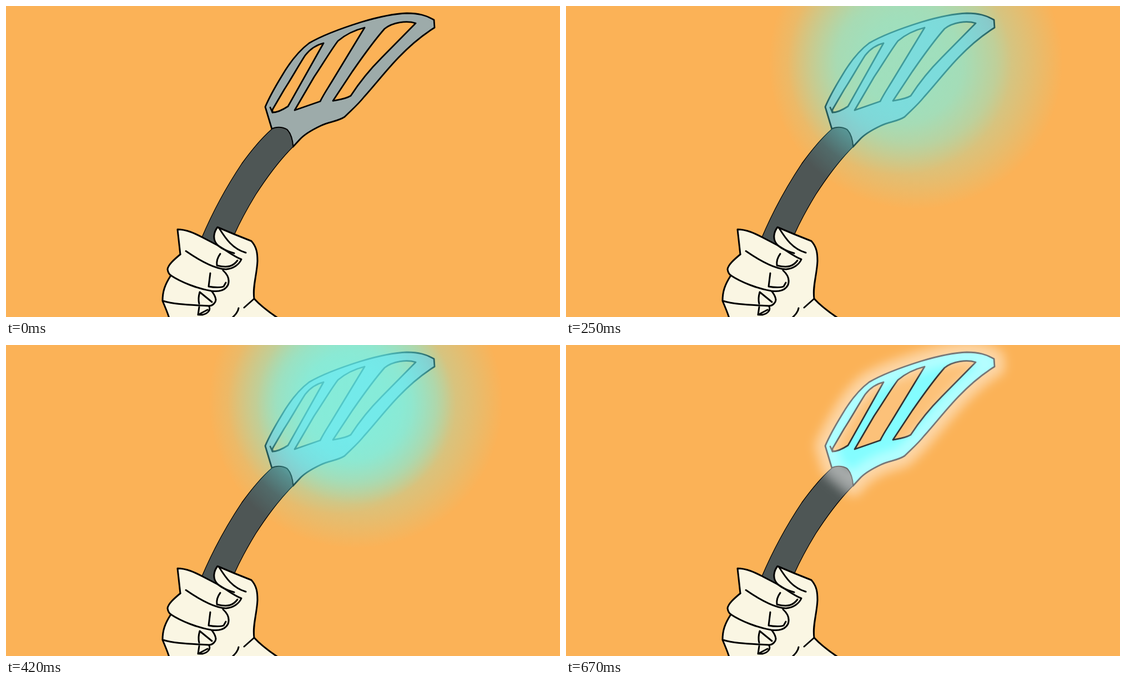
These frames come from a looping animation (998x561 px, 930 ms). An HTML page:

```html
<!DOCTYPE html>
<html lang="en">
<head>
<meta charset="utf-8">
<title>Glowing spatula</title>
<style>
  html, body { margin: 0; width: 100%; height: 100%; overflow: hidden; background: #fbb257; }
  svg { display: block; width: 100%; height: 100%; }
</style>
</head>
<body>
<svg viewBox="0 0 998 561" fill="none" stroke-linecap="round" stroke-linejoin="round">
  <defs>
    <path id="rim" d="M479 222L467 182C475 163 486 144 497 126C511 102 526 82 546 67C568 54 605 40 640 29
      C670 20 695 14 722 13C744 13 757 17 771 25L772 39C748 54 728 71 707 93C684 117 664 143 645 164
      C634 178 622 188 610 200C598 208 582 209 567 216C548 225 537 232 529 241L517 254Z"/>
    <path id="blade" fill-rule="evenodd" d="M479 222L467 182C475 163 486 144 497 126C511 102 526 82 546 67C568 54 605 40 640 29
      C670 20 695 14 722 13C744 13 757 17 771 25L772 39C748 54 728 71 707 93C684 117 664 143 645 164
      C634 178 622 188 610 200C598 208 582 209 567 216C548 225 537 232 529 241L517 254C516 241 513 230 506 223C497 218 486 218 479 222Z
      M572 67C560 70 549 76 539 89C529 104 514 131 501 151L480 187V192C489 192 499 187 508 181Z
      M646 39C626 44 611 52 598 63C585 80 570 106 555 128L520 188L566 172C573 158 580 148 586 138Z
      M738 31C722 26 697 29 682 41C660 66 640 95 624 118L589 171C600 169 611 168 621 162C636 139 655 115 676 94Z"/>
    <radialGradient id="soft">
      <stop offset=".35" stop-color="#68fafa"/>
      <stop offset=".55" stop-color="#68fafa" stop-opacity=".88"/>
      <stop offset=".8" stop-color="#68fafa" stop-opacity=".4"/>
      <stop offset="1" stop-color="#68fafa" stop-opacity="0"/>
    </radialGradient>
    <filter id="blur" x="-20%" y="-20%" width="140%" height="140%"><feGaussianBlur stdDeviation="2"/></filter>
    <filter id="halo" x="-20%" y="-20%" width="140%" height="140%"><feGaussianBlur stdDeviation="9"/></filter>
  </defs>

  <!-- spatula -->
  <use href="#blade" fill="#9dabaa"/>
  <use href="#blade" class="hot" fill="#64fdff"/>
  <use href="#blade" stroke="#000" stroke-width="2.8"/>
  <path d="M476 183L480 192" stroke="#000" stroke-width="2.8"/>
  <path d="M353 417C370 377 395 329 425 284C441 262 459 239 479 222C486 218 497 218 506 223C513 230 516 241 517 254
    C497 274 472 306 450 340C436 363 423 386 411 413L380 432Z" fill="#4e5655" stroke="#000" stroke-width="1.3"/>

  <!-- glow -->
  <circle class="glow" cx="601" cy="103" r="202" fill="url(#soft)"/>
  <circle class="glow" cx="630" cy="102" r="265" fill="url(#soft)"/>
  <circle class="glow" cx="631" cy="108" r="180" fill="url(#soft)"/>
  <use class="glow" href="#blade" fill="#64fdff" filter="url(#blur)"/>
  <use class="hot" href="#rim" fill="#fff" fill-opacity=".2" stroke="#fff" stroke-width="38" stroke-opacity=".42" filter="url(#halo)"/>

  <!-- hand -->
  <path fill="#faf6e3" d="M309 403C325 403 340 410 355 418L378 431C372 421 374 408 381 399L412 412L442 424
    C452 435 453 447 453 460C452 485 444 505 447 528C458 540 472 551 488 561H293C291 553 288 546 282 532
    C282 515 286 503 297 486C294 484 292 482 291 475C292 467 302 458 314 448Z"/>
  <g stroke="#000" stroke-width="3">
    <path d="M314 448L309 403C325 403 340 410 355 418L378 430C392 437 408 451 424 457C420 466 410 474 396 475C375 474 350 460 324 442"/>
    <path d="M411 446C398 442 386 437 380 430C372 421 374 408 381 399L412 412L442 424C452 435 453 447 453 460
      C452 485 444 505 447 528C458 540 472 551 490 563"/>
    <path d="M384 401C396 420 408 438 432 445M386 447C380 455 379 461 380 468C388 470 398 471 404 469C410 467 414 463 417 459"/>
    <path d="M314 448C302 458 292 467 291 475C292 482 294 484 297 486C315 498 345 510 370 514C385 516 395 513 400 503C403 494 400 485 391 477"/>
    <path d="M368 482L365 506C375 508 388 508 392 506L396 499"/>
    <path d="M297 486C286 503 282 515 282 532C288 546 291 553 294 563M283 532C305 539 335 539 365 541C374 541 378 533 378 530C377 522 373 518 371 515"/>
    <path d="M348 537C346 530 347 523 349 516L371 534M348 543L346 557L363 548M366 542C369 549 363 555 354 557L348 557"/>
    <path d="M429 544L447 528M419 545C418 552 413 557 407 563"/>
  </g>
</svg>
<script>
  const LOOP = 930;
  const starts = [0, 80, 170, 250, 330, 420, 500, 580, 670];
  const strength = [.39, .38, .46, .8];
  const glows = document.querySelectorAll('.glow');
  const hot = document.querySelectorAll('.hot');
  const clamp = v => Math.min(1, Math.max(0, v));

  function draw() {
    const t = performance.now() % LOOP;
    const step = starts.filter(s => s <= t).length - 1;
    const charged = step === 8;
    const levels = [step, (step - 1) / 2, (step - 3) / 2, (step - 5) / 2];
    glows.forEach((el, i) => el.style.opacity = charged ? 0 : clamp(levels[i]) * strength[i]);
    hot.forEach(el => el.style.opacity = charged ? 1 : 0);
    requestAnimationFrame(draw);
  }
  draw();
</script>
</body>
</html>
```
